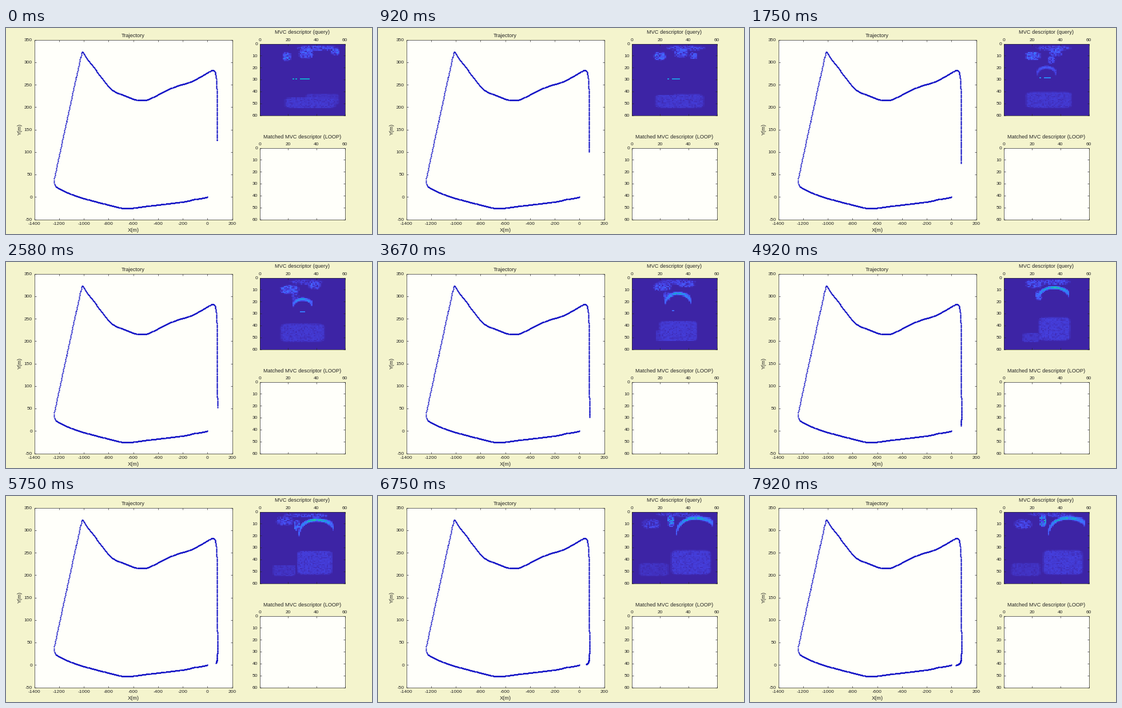
These frames come from a looping animation (640x360 px, 8000 ms). A matplotlib script:

```python
import numpy as np
import matplotlib.pyplot as plt
from matplotlib.animation import FuncAnimation
from matplotlib.colors import LinearSegmentedColormap

W, H, DPI = 640, 360, 100
FRAMES, INTERVAL = 200, 40
TICK = 1000 / 12          # display clock
INK, PAPER, BACK = "#262626", "#fffffa", "#f4f4cd"
BLUE = "#0d0dc4"

plt.rcParams.update({
    "font.family": "Liberation Sans", "axes.unicode_minus": False,
    "text.color": INK, "axes.edgecolor": INK, "axes.linewidth": 0.5,
})
PARULA = LinearSegmentedColormap.from_list("parula_like", [
    "#3d24a5", "#4746eb", "#4367fd", "#2d87f7", "#12aacd",
    "#38c896", "#96cb4e", "#f9ba3d", "#f9fb15"])

# The data runs at 10 fps, with a few pauses of its own.
PAUSES = (43, 53, 72, 89, 90, 92, 95)
STEPS = np.cumsum([n > 0 and n % 6 != 4 and n not in PAUSES for n in range(96)])


# ---------- trajectory ----------

ROUTE = [
    (0, 0), (-43, -3), (-117, -5.5), (-158, -9.5), (-334, -15.6), (-519, -21.3),
    (-660, -27), (-750, -21.3), (-1028, -1.6), (-1120, 8), (-1203, 18.8),
    (-1238, 25), (-1240, 40), (-1231, 52), (-1022, 318), (-1010, 324),
    (-995, 317), (-972, 306), (-935, 294), (-857, 266), (-787, 241),
    (-741, 233), (-644, 222.6), (-584, 216.3), (-528, 214.6), (-475, 216.5),
    (-353, 235), (-242, 248), (-168, 252.6), (-103, 260.5), (0, 276), (40, 284),
    (61, 279), (71, 265), (76, 240), (78.5, 172), (79, 128)]
# step, x, y of the newest point
RECENT = np.array([
    (0, 79, 126), (9, 79.5, 101), (26, 80, 53), (36, 80.5, 31), (47, 78, 12),
    (56, 70, 4.5), (65, 55, 1.5), (72, 38, -0.5)])


def round_corners(points, times=2):
    """Chaikin corner cutting with fixed ends."""
    p = np.array(points, float)
    for _ in range(times):
        a, b = p[:-1], p[1:]
        cut = np.stack([0.75 * a + 0.25 * b, 0.25 * a + 0.75 * b], 1).reshape(-1, 2)
        p = np.vstack([p[:1], cut, p[-1:]])
    return p


def resample(points, gap):
    """Points spaced evenly along a polyline."""
    dist = np.r_[0, np.cumsum(np.hypot(*np.diff(points, axis=0).T))]
    at = np.linspace(0, dist[-1], int(dist[-1] / gap) + 1)
    return np.column_stack([np.interp(at, dist, c) for c in points.T])


curve = round_corners(ROUTE)
turn = np.argmax(curve[:, 0] > 58)
PAST = np.vstack([resample(curve[:turn + 1], 4.8), resample(curve[turn:], 2.9)])


def track(step):
    s = np.arange(step + 1)
    new = np.column_stack([np.interp(s, RECENT[:, 0], RECENT[:, k]) for k in (1, 2)])
    return np.vstack([PAST, new])


# ---------- descriptor ----------

KEYS = (0, 26, 47, 65)
N = 60
ROW, COL = np.mgrid[0:N, 0:N] + 0.5
STILL = np.random.default_rng(4).random((N, N))

# Speckled patches, one row per key: left, right, top, bottom, level
LEFT = [(16, 22, 7, 15, .22), (14, 28, 6, 14, .18),
        (15, 28, 2, 9, .14), (7, 20, 6, 15, .1)]
RIGHT = [(27, 38, 4, 13, .16), (34, 43, 3, 10, .15),
         (28, 47, 2, 6, .13), (30, 50, 2, 5, .08)]
POLE = [(50, 56, 4, 10, .2), (22, 28, 13, 20, .08),
        (22, 27, 11, 19, .18), (25, 30, 3, 13, .36)]
STREAK = [(25, 56, 2, 6, .13), (20, 45, 2, 6, .07),
          (15, 47, 2, 6, .1), (16, 46, 1, 4, .07)]
GROUND = [(17, 54, 45, 54, .07), (14, 46, 38, 54, .07),
          (24, 47, 33, 53, .08), (27, 56, 32, 53, .08)]
VERGE = [(32, 56, 42, 51, .05), (20, 38, 42, 53, .05),
         (13, 25, 46, 54, .06), (5, 26, 43, 54, .05)]
# Arch: centre, top row, half width, left drop, right drop, level
ARCH = [(30, 24, 6, 5, 5, -.3), (30, 18, 7.5, 8, 7, .42),
        (35, 8.3, 11.5, 11, 9, .56), (44, 5.5, 12.7, 14, 5, .52)]


def tween(keys, step):
    return [np.interp(step, KEYS, v) for v in zip(*keys)]


def patch(keys, step, power):
    left, right, top, bottom, level = tween(keys, step)
    u = (COL - (left + right) / 2) / ((right - left) / 2)
    v = (ROW - (top + bottom) / 2) / ((bottom - top) / 2)
    return level * np.clip(1.6 * (1 - abs(u) ** power - abs(v) ** power), 0, 1)


def descriptor(step):
    fresh = np.random.default_rng(100 + step).random((N, N))
    noise = np.where(fresh < 0.5, STILL, fresh)
    img = np.zeros((N, N))
    for keys in (LEFT, RIGHT, POLE, STREAK):
        img = np.maximum(img, patch(keys, step, 3) * (0.15 + 1.5 * noise ** 2))
    for keys in (GROUND, VERGE):
        img = np.maximum(img, patch(keys, step, 8) * (0.5 + 0.8 * noise))

    # short dashes near row 30, fading as the arch grows
    dash = (abs(COL - 29) < 6 - step / 8) & (ROW.astype(int) == 29 - step // 18)
    img = np.maximum(img, max(0, 0.5 - step / 150) * (step < 44) * dash * (STILL[7] > 0.4))

    mid, top, half, drop_l, drop_r, level = tween(ARCH, step)
    u = (COL - mid) / half
    bend = 1 - np.sqrt(np.clip(1 - u ** 2, 0, 1))
    ridge = top + np.where(u < 0, drop_l, drop_r) * bend
    reach = 1.2 + 2.2 * np.clip(abs(u) - 0.5, 0, 1)
    band = np.clip(1.5 - abs(ROW - ridge) / reach, 0, 1) * (abs(u) < 1)
    arch = level * band * (1 - 0.5 * u ** 2) * (0.6 + 0.5 * noise)
    return np.maximum(img, arch)


# ---------- figure ----------

fig = plt.figure(figsize=(W / DPI, H / DPI), dpi=DPI, facecolor=BACK)


def panel(left, top, right, bottom):
    ax = fig.add_axes([left / W, 1 - bottom / H, (right - left) / W, (bottom - top) / H],
                      facecolor=PAPER)
    ax.tick_params(direction="in", length=2.2, width=0.5, color=INK, labelcolor=INK,
                   labelsize=6.05, top=True, right=True)
    ax.tick_params(axis="y", pad=2.5)
    return ax


def label(x, y, text, **kw):
    opts = dict(ha="center", va="baseline", fontsize=6.65)
    fig.text(x / W, 1 - y / H, text, **{**opts, **kw})


def grid_panel(top, bottom):
    ax = panel(443.5, top, 592.5, bottom)
    ax.set(xlim=(0, N), ylim=(N, 0), xticks=range(0, 61, 20), yticks=range(0, 61, 10))
    ax.tick_params(axis="x", labeltop=True, labelbottom=False, pad=2)
    return ax


plot = panel(49.5, 20.5, 395.5, 334.5)
plot.set(xlim=(-1400, 200), ylim=(-50, 350),
         xticks=range(-1400, 201, 200), yticks=range(-50, 351, 50))
plot.tick_params(axis="x", pad=3)
dots, = plot.plot([], [], "o", ms=1.75, mew=0, color=BLUE)

query = grid_panel(27.5, 152.5)
image = query.imshow(np.zeros((N, N)), cmap=PARULA, vmin=0, vmax=1, aspect="auto",
                     extent=(0, N, N, 0), interpolation="nearest")
grid_panel(209.5, 334.5)

label(222.5, 16.5, "Trajectory")
label(222.5, 356, "X(m)")
label(24, 177, "Y(m)", rotation=90, va="center")
label(518, 10.5, "MVC descriptor (query)")
label(518, 193, "Matched MVC descriptor (LOOP)")


def update(frame):
    tick = min(int((frame * INTERVAL + 30) / TICK), len(STEPS) - 1)
    step = int(STEPS[tick])
    dots.set_data(*track(step).T)
    image.set_data(descriptor(step))
    return dots, image


anim = FuncAnimation(fig, update, frames=FRAMES, interval=INTERVAL,
                     repeat=True, repeat_delay=0, blit=False)
plt.show()
```
